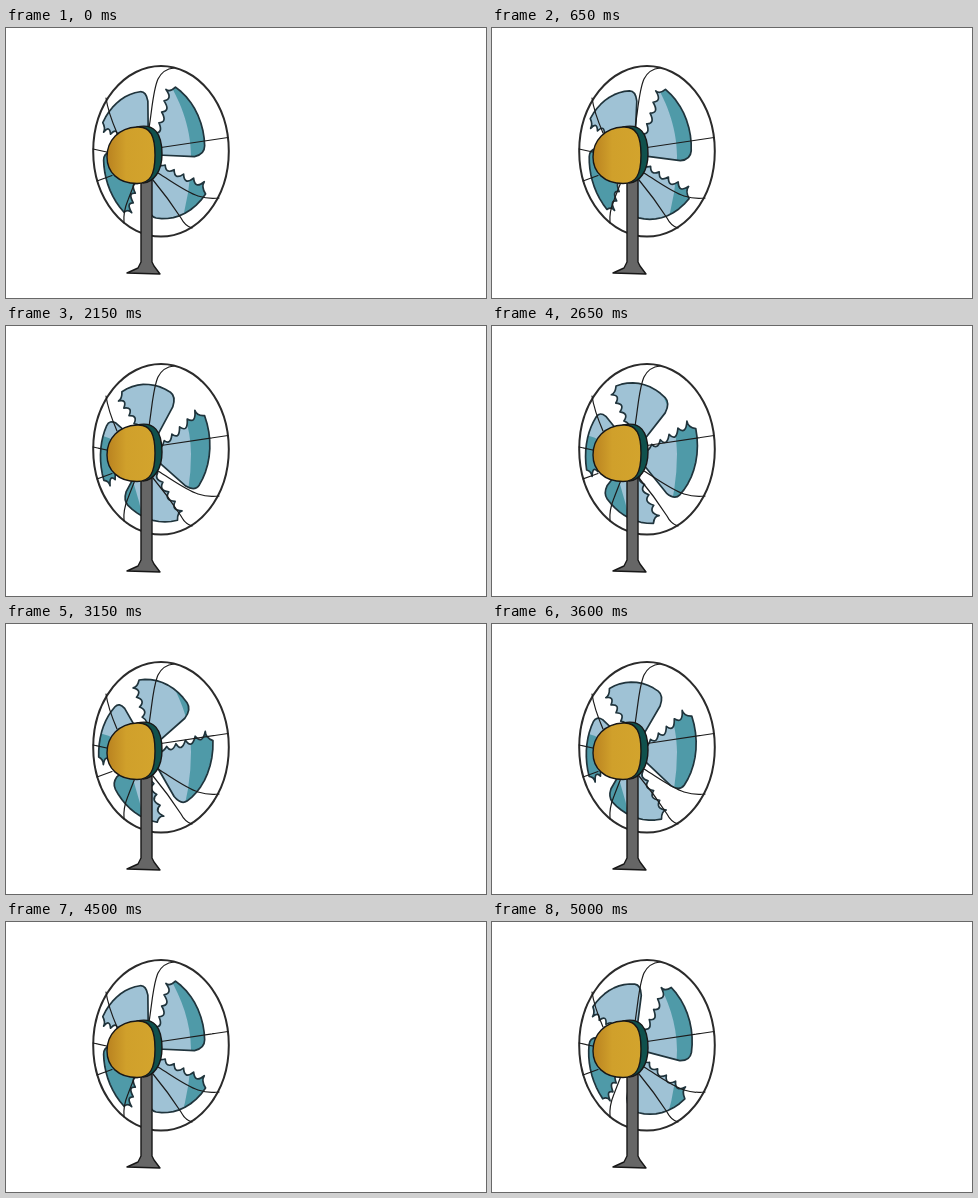
These frames come from a looping animation (480x270 px, 5050 ms). An HTML page:

```html
<!DOCTYPE html>
<html lang="en">
<head>
<meta charset="utf-8">
<title>Fan</title>
<style>
html, body { margin: 0; width: 100%; height: 100%; overflow: hidden; background: #fff; }
svg { display: block; width: 100vw; height: 100vh; }
</style>
</head>
<body>
<svg viewBox="0 0 480 270" fill="none" stroke-linecap="round" stroke-linejoin="round">
  <defs>
    <clipPath id="lit">
      <path d="M90 50H160C173 70 185 98 185 128Q185 165 173 202H139Q130 155 112 118Q104 110 90 109Z"/>
    </clipPath>
    <linearGradient id="gold">
      <stop offset="0" stop-color="#b98220"/>
      <stop offset=".4" stop-color="#d0a02b"/>
      <stop offset="1" stop-color="#d3a42d"/>
    </linearGradient>
  </defs>

  <ellipse cx="155" cy="123.3" rx="67.8" ry="85.3" stroke="#2b2b2b" stroke-width="2"/>
  <path class="blades" fill="#4f9aa8"/>
  <path class="blades" fill="#9fc2d5" clip-path="url(#lit)"/>
  <path class="blades" stroke="#20343c" stroke-width="1.7"/>

  <g stroke="#1c1c1c" stroke-width="1.2">
    <path d="M143 100C146 82 147 62 152 51Q157 41 168 40"/>
    <path d="M155 119.500L222 109.500"/>
    <path d="M152 145C168 155 180 164 192 168Q203 171.500 213 170"/>
    <path d="M147 152Q162 170 175 190Q179 198 186 200"/>
    <path d="M87 121L103 124.500"/>
    <path d="M91 153L106 147.500"/>
    <path d="M118 195Q117 184 122 172L129 154"/>
    <path d="M100 70Q102 84 111 105"/>
  </g>

  <g stroke="#171717" stroke-width="1.4">
    <path fill="#666" d="M135 150H146V234L148 238L154 246L121 245L132 240L135 234Z"/>
    <path fill="#10514d" d="M131 99C148 95 156 105 156 126C156 143 148 154 137 155Z"/>
    <path fill="url(#gold)" d="M131 99C145 98 149 109 149 127C149 147 144 155.500 131 155.500C112 155.500 101 144 101 129C101 112 113 100 131 99Z"/>
  </g>
</svg>
<script>
const FRAME = 50, COUNT = 101, STEP = 28, START = 21.5;
const TEETH = 5, GAP = .16, ROOT = .18;

const layers = document.querySelectorAll('.blades');

// The wheel is seen at a slant, with its right side nearer.
function project(angle, radius) {
  const a = angle * Math.PI / 180;
  const u = radius * Math.sin(a), v = radius * Math.cos(a);
  const near = 1 / (1 - .13 * u);
  const x = 142 + (53.5 * u - 2.5 * v) * near;
  const y = 126 - 67.5 * v * near;
  return `${x.toFixed(2)} ${y.toFixed(2)}`;
}

function blade(turn) {
  const at = (angle, radius) => project(turn + angle, radius);
  let d = 'M' + at(20, ROOT);

  // Sharp teeth with rounded gaps that get shallower towards the tip.
  for (let i = 1; i <= TEETH; i++) {
    const r = ROOT + GAP * i, mid = r - GAP / 2;
    d += `Q${at(32 - 24 * mid, mid)} ${at(9 - 9 * r, r)}`;
  }
  d += `Q${at(5, .96)} ${at(8, 1.06)}`;

  // The rim draws in slowly, then turns a soft corner back to the hub.
  for (let a = 14; a <= 62; a += 6) d += 'L' + at(a, 1.06 - .0022 * (a - 8));
  return d + `Q${at(69, .93)} ${at(71, .78)}L${at(73, ROOT)}Z`;
}

function draw(ms) {
  const turn = START + STEP * (Math.floor(ms / FRAME) % COUNT);
  const d = [0, 90, 180, 270].map(a => blade(turn + a)).join('');
  layers.forEach(layer => layer.setAttribute('d', d));
}

const begin = performance.now();
function tick() {
  draw(performance.now() - begin);
  requestAnimationFrame(tick);
}
tick();
</script>
</body>
</html>
```
